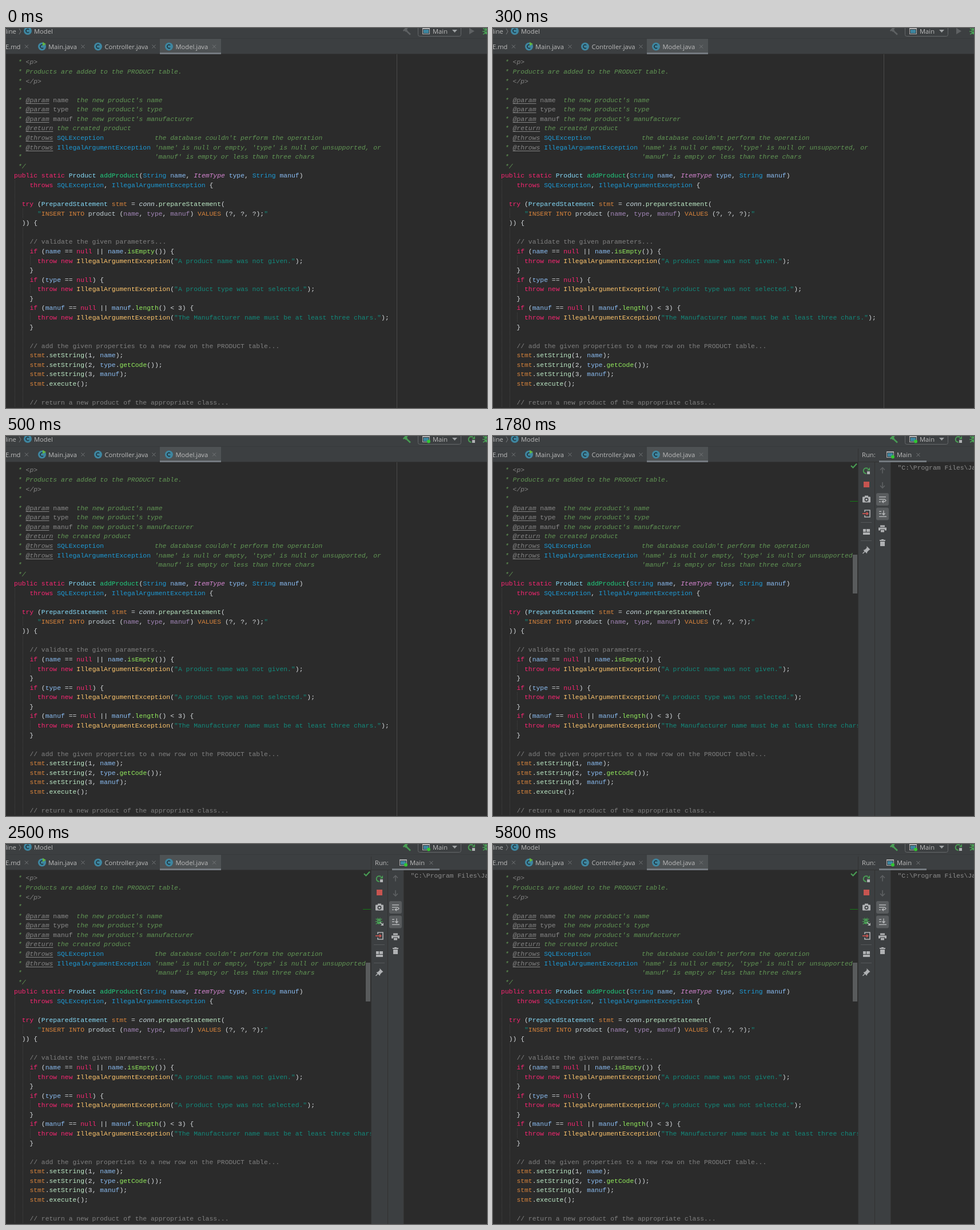
Animation of 841x666 px, one loop 8000 ms. Source, as an HTML page with a canvas:

```html
<!DOCTYPE html>
<html lang="en">
<head>
<meta charset="utf-8">
<title>Editor run</title>
<style>
html, body { margin: 0; width: 100%; height: 100%; overflow: hidden; background: #2b2b2b; }
canvas { display: block; }
</style>
</head>
<body>
<canvas id="stage" width="841" height="666"></canvas>
<script>
const ctx = document.getElementById('stage').getContext('2d');
const LOOP = 8000, BUILT = 500, OPENED = 700, ATTACHED = 2500;
const PITCH = 6.83, LEFT = 0.4, ROW = 16.58, BASE = 63.35;
const MONO = '11.38px "Liberation Mono", "Courier New", monospace';
const UI = '11.2px "Open Sans", "Noto Sans", sans-serif';
const BG = '#2b2b2b', BAR = '#3c3f41', EDGE = '#323232', ICON = '#afb1b3',
      DIM = '#5e6163', GREEN = '#499c54', RED = '#c75450', BLUE = '#3e86a0',
      MARK = '#747a80';

// Style letter -> colour, italic, underline
const STYLES = {
  d: ['#629755', 1], h: ['#858585', 1], v: ['#8a8a8a'], u: ['#858585', 1, 1],
  b: ['#1c9ad6'], k: ['#f92672'], c: ['#86dcfa'], g: ['#20d080'],
  w: ['#d6dadd'], p: ['#8abcf2'], i: ['#d686d2', 1], o: ['#d8843c'],
  n: ['#d0e2e8', 1], f: ['#bdeac6'], m: ['#92ea5c'], s: ['#128a7c'],
  y: ['#ffc66d'], x: ['#808080'], q: ['#a386b8'], r: ['#c3d0d6']
};

const fail = text => `        ~kthrow new ~yIllegalArgumentException~w(~s"${text}"~w);`;
const CODE = [
  '~d   * ~h<p>',
  '~d   * Products are added to the PRODUCT table.',
  '~d   * ~h</p>',
  '~d   *',
  "~d   * ~u@param~v name~d  the new product's name",
  "~d   * ~u@param~v type~d  the new product's type",
  "~d   * ~u@param~v manuf~d the new product's manufacturer",
  '~d   * ~u@return~d the created product',
  "~d   * ~u@throws~b SQLException~d             the database couldn't perform the operation",
  "~d   * ~u@throws~b IllegalArgumentException~d 'name' is null or empty, 'type' is null or unsupported, or",
  '~d   *' + ' '.repeat(34) + "'manuf' is empty or less than three chars",
  '~d   */',
  '  ~kpublic static ~cProduct ~gaddProduct~w(~bString ~pname~w, ~iItemType ~ptype~w, ~bString ~pmanuf~w)',
  '      ~kthrows ~bSQLException~w, ~bIllegalArgumentException ~w{',
  '',
  '    ~ktry ~w(~cPreparedStatement ~ostmt ~w= ~nconn~w.~fprepareStatement~w(',
  '        ~s"~oINSERT INTO ~rproduct ~w(~qname~w, ~qtype~w, ~qmanuf~w) ~oVALUES ~w(?, ?, ?);~s"',
  '    )) {',
  '',
  '      ~x// validate the given parameters...',
  '      ~kif ~w(~pname ~w== ~knull ~w|| ~pname~w.~misEmpty~w()) {',
  fail('A product name was not given.'),
  '      }',
  '      ~kif ~w(~ptype ~w== ~knull~w) {',
  fail('A product type was not selected.'),
  '      }',
  '      ~kif ~w(~pmanuf ~w== ~knull ~w|| ~pmanuf~w.~mlength~w() < 3) {',
  fail('The Manufacturer name must be at least three chars.'),
  '      }',
  '',
  '      ~x// add the given properties to a new row on the PRODUCT table...',
  '      ~ostmt~w.~fsetString~w(1, ~pname~w);',
  '      ~ostmt~w.~fsetString~w(2, ~ptype~w.~mgetCode~w());',
  '      ~ostmt~w.~fsetString~w(3, ~pmanuf~w);',
  '      ~ostmt~w.~fexecute~w();',
  '',
  '      ~x// return a new product of the appropriate class...'
];

function rect(x, y, w, h, color) {
  ctx.fillStyle = color;
  ctx.fillRect(x, y, w, h);
}
function round(x, y, w, h, r, color) {
  ctx.fillStyle = color;
  ctx.beginPath();
  ctx.roundRect(x, y, w, h, r);
  ctx.fill();
}
function path(pts) {
  ctx.beginPath();
  for (let i = 0; i < pts.length; i += 2) ctx.lineTo(pts[i], pts[i + 1]);
}
function line(color, width, ...pts) {
  path(pts);
  ctx.strokeStyle = color;
  ctx.lineWidth = width;
  ctx.stroke();
}
function poly(color, ...pts) {
  path(pts);
  ctx.fillStyle = color;
  ctx.fill();
}
function disc(x, y, rx, color, ry = rx) {
  ctx.fillStyle = color;
  ctx.beginPath();
  ctx.ellipse(x, y, rx, ry, 0, 0, 7);
  ctx.fill();
}
function label(str, x, y, color = '#bbbbbb', font = UI) {
  ctx.font = font;
  ctx.fillStyle = color;
  ctx.fillText(str, x, y);
}
function at(x, y, draw) {
  ctx.save();
  ctx.translate(x, y);
  draw();
  ctx.restore();
}

function codeRow(src, row) {
  const y = Math.round(BASE + row * ROW);
  let col = 0;
  src.split(/(?=~[a-z])/).forEach(part => {
    const marked = part[0] === '~';
    const [color, italic, under] = STYLES[marked ? part[1] : 'w'];
    const str = marked ? part.slice(2) : part;
    const x = LEFT + col * PITCH;
    label(str, x, y, color, (italic ? 'italic ' : '') + MONO);
    if (under) rect(x, y + 2, str.length * PITCH, 1, color);
    col += str.length;
  });
}

function guide(col, from, to) {
  const x = Math.round(LEFT + col * PITCH) + 1.5;
  ctx.setLineDash([1, 1]);
  line('#454545', 1, x, 51 + from * ROW, x, 51 + (to + 1) * ROW);
  ctx.setLineDash([]);
}

function closeMark(x, y) {
  line('#737678', 1, x - 3, y - 3, x + 3, y + 3);
  line('#737678', 1, x + 3, y - 3, x - 3, y + 3);
}
function classIcon(x, y, runnable) {
  disc(x, y, 7, BLUE);
  ctx.beginPath();
  ctx.arc(x, y, 3, 0.8, 5.5);
  ctx.strokeStyle = '#1f3038';
  ctx.lineWidth = 1.4;
  ctx.stroke();
  if (runnable) poly('#62b543', x + 1, y - 8, x + 7, y - 4.5, x + 1, y - 1);
}
function appIcon(x, y, live) {
  rect(x, y, 13, 11, ICON);
  rect(x + 1, y + 2, 11, 8, BAR);
  rect(x + 2, y + 3, 9, 6, BLUE);
  if (live) disc(x + 11, y + 9.5, 3, '#32c832');
}
function hammer(color) {
  line(color, 2.6, 698, 3, 707, 11.5);
  poly(color, 694, 4, 699, -1, 704, -1, 701, 2, 702, 4, 699, 7, 697, 5, 695, 6);
}
function rerun(x, y) {
  at(x, y, () => {
    ctx.beginPath();
    ctx.arc(-0.5, 0, 4.8, 1.5, 5.4);
    ctx.strokeStyle = GREEN;
    ctx.lineWidth = 2;
    ctx.stroke();
    poly(GREEN, 0.5, -0.5, 6, -0.5, 6, -6);
    rect(1, 1, 5, 5, ICON);
  });
}
function bug(x, y, s = 1) {
  at(x, y, () => {
    ctx.scale(s, s);
    disc(0, 1, 3.7, GREEN, 5);
    for (const k of [-1, 1]) {
      line(GREEN, 1.4, 0, -2, 6 * k, -4);
      line(GREEN, 1.4, 0, 1, 7 * k, 1);
      line(GREEN, 1.4, 0, 3, 6 * k, 6);
      line(GREEN, 1.2, 0, -3, 3 * k, -6);
    }
    rect(-2.5, 0, 5, 1, BAR);
  });
}
function arrow(x, y, dir) {
  line(DIM, 1.6, x, y - 5 * dir, x, y + 5 * dir);
  line(DIM, 1.6, x - 4, y + dir, x, y + 5 * dir, x + 4, y + dir);
}
function camera(x, y) {
  round(x - 7, y - 4, 14, 10, 1, ICON);
  rect(x - 3, y - 6, 6, 3, ICON);
  disc(x, y + 1, 3.4, BAR);
  disc(x, y + 1, 1.8, ICON);
}
function exitIcon(x, y) {
  line(ICON, 1.6, x - 3, y - 3, x - 3, y - 6, x + 6, y - 6, x + 6, y + 6, x - 3, y + 6, x - 3, y + 3);
  line(RED, 1.8, x - 7, y, x + 1, y);
  poly(RED, x, y - 3.5, x + 4, y, x, y + 3.5);
}
function layoutIcon(x, y) {
  rect(x - 6, y - 5, 5, 5, ICON);
  rect(x, y - 5, 6, 5, ICON);
  rect(x - 6, y + 1, 12, 4, ICON);
}
function pin(x, y) {
  poly(ICON, x + 1, y - 7, x + 7, y - 1, x + 5, y, x + 2, y + 3, x + 1, y + 6, x - 5, y, x - 2, y - 1, x + 1, y - 4);
  line(ICON, 1.4, x - 2, y + 2, x - 6, y + 6);
}
function wrapIcon(x, y) {
  rect(x - 6, y - 5, 12, 1.5, ICON);
  line(ICON, 1.5, x - 6, y, x + 4, y, x + 6, y + 2, x + 4, y + 4, x + 1, y + 4);
  poly(ICON, x + 2, y + 1, x - 2, y + 4, x + 2, y + 7);
  rect(x - 6, y + 3.5, 3, 1.5, ICON);
}
function endIcon(x, y) {
  rect(x - 6, y - 5, 4, 1.5, ICON);
  rect(x - 6, y - 1, 4, 1.5, ICON);
  rect(x - 6, y + 4, 13, 1.5, ICON);
  line(ICON, 1.5, x + 2, y - 6, x + 2, y + 1);
  poly(ICON, x - 1.5, y - 1, x + 5.5, y - 1, x + 2, y + 3);
}
function printer(x, y) {
  rect(x - 4, y - 6, 8, 3, ICON);
  rect(x - 7, y - 2, 14, 5, ICON);
  rect(x - 4, y + 1, 8, 5, BAR);
  rect(x - 3, y + 2, 6, 4, ICON);
}
function trash(x, y) {
  rect(x - 5, y - 5, 10, 2, ICON);
  rect(x - 2, y - 6, 4, 1, ICON);
  rect(x - 4, y - 2, 8, 8, ICON);
}

function editor() {
  guide(2, 13, 36);
  guide(4, 16, 16);
  guide(4, 18, 36);
  [21, 24, 27].forEach(r => guide(6, r, r));
  CODE.forEach(codeRow);
}

function topBars(built) {
  rect(0, 0, 841, 46, BAR);
  rect(0, 18, 841, 1, '#37393b');
  rect(0, 45, 841, 1, EDGE);
  label('line', -1, 10);
  line('#7a7d7f', 1, 23, 1, 26, 6, 23, 11);
  classIcon(38, 5);
  label('Model', 49, 10);

  rect(269, 19, 107, 27, '#4e5254');
  rect(269, 43, 107, 3, MARK);
  label('E.md', -1, 37);
  classIcon(63, 32.5, true);
  label('Main.java', 74, 37);
  classIcon(161, 32.5);
  label('Controller.java', 172.5, 37);
  classIcon(285, 32.5);
  label('Model.java', 296.5, 37);
  [36, 134.5, 258.5, 364].forEach(x => closeMark(x, 32.5));

  hammer(built ? GREEN : DIM);
  ctx.strokeStyle = '#646769';
  ctx.lineWidth = 1;
  ctx.beginPath();
  ctx.roundRect(720.5, -8.5, 75, 23, 3);
  ctx.stroke();
  appIcon(728, 0, built);
  label('Main', 746, 10);
  poly('#9da0a2', 780, 3, 789, 3, 784.5, 8);
  if (built) rerun(814, 6);
  else poly(DIM, 810, 0, 819, 5.5, 810, 11);
  bug(840, 5);
}

function runPanel(attached) {
  rect(629, 208, 8, 68, '#595b5c');
  line(GREEN, 2.2, 626, 52, 629.5, 55.5, 636, 48.5);
  rect(624, 114, 14, 1, '#147a14');

  rect(638, 22, 203, 644, BAR);
  rect(638, 22, 1, 644, EDGE);
  rect(639, 45, 202, 1, EDGE);
  rect(667, 46, 1, 620, EDGE);
  rect(695, 46, 146, 620, BG);
  rect(695, 46, 1, 620, EDGE);
  label('Run:', 645, 37);
  appIcon(688, 27, true);
  label('Main', 706, 37);
  closeMark(743.5, 33);
  rect(675, 43, 83, 3, MARK);
  label('"C:\\Program Files\\Ja', 707.5, 59, '#8c8c8c', MONO);

  rerun(653, 61);
  rect(648, 80, 10, 10, RED);
  camera(653, 110.5);
  if (attached) {
    bug(652, 135, 0.9);
    line(ICON, 1.6, 654, 137, 659, 142);
    poly(ICON, 660, 138, 660, 143, 655, 143);
  }
  const drop = attached ? 25 : 0;
  exitIcon(653, 136 + drop);
  rect(643, 151 + drop, 19, 1, '#555759');
  layoutIcon(653, 168 + drop);
  rect(643, 183 + drop, 19, 1, '#555759');
  pin(652.5, 200 + drop);

  arrow(681, 60.5, -1);
  arrow(681, 86, 1);
  round(670, 100, 22, 22, 3, '#595c5e');
  round(670, 125.5, 22, 22, 3, '#595c5e');
  wrapIcon(681, 111);
  endIcon(681, 136.5);
  printer(681, 162.5);
  trash(681, 187);
}

function draw(t) {
  const opened = t >= OPENED;
  rect(0, 0, 841, 666, BG);
  if (!opened) rect(683, 46, 1, 620, '#4b4b4b');
  editor();
  topBars(t >= BUILT);
  if (opened) runPanel(t >= ATTACHED);
}

const start = performance.now();
function tick() {
  draw((performance.now() - start) % LOOP);
  requestAnimationFrame(tick);
}
tick();
</script>
</body>
</html>
```
